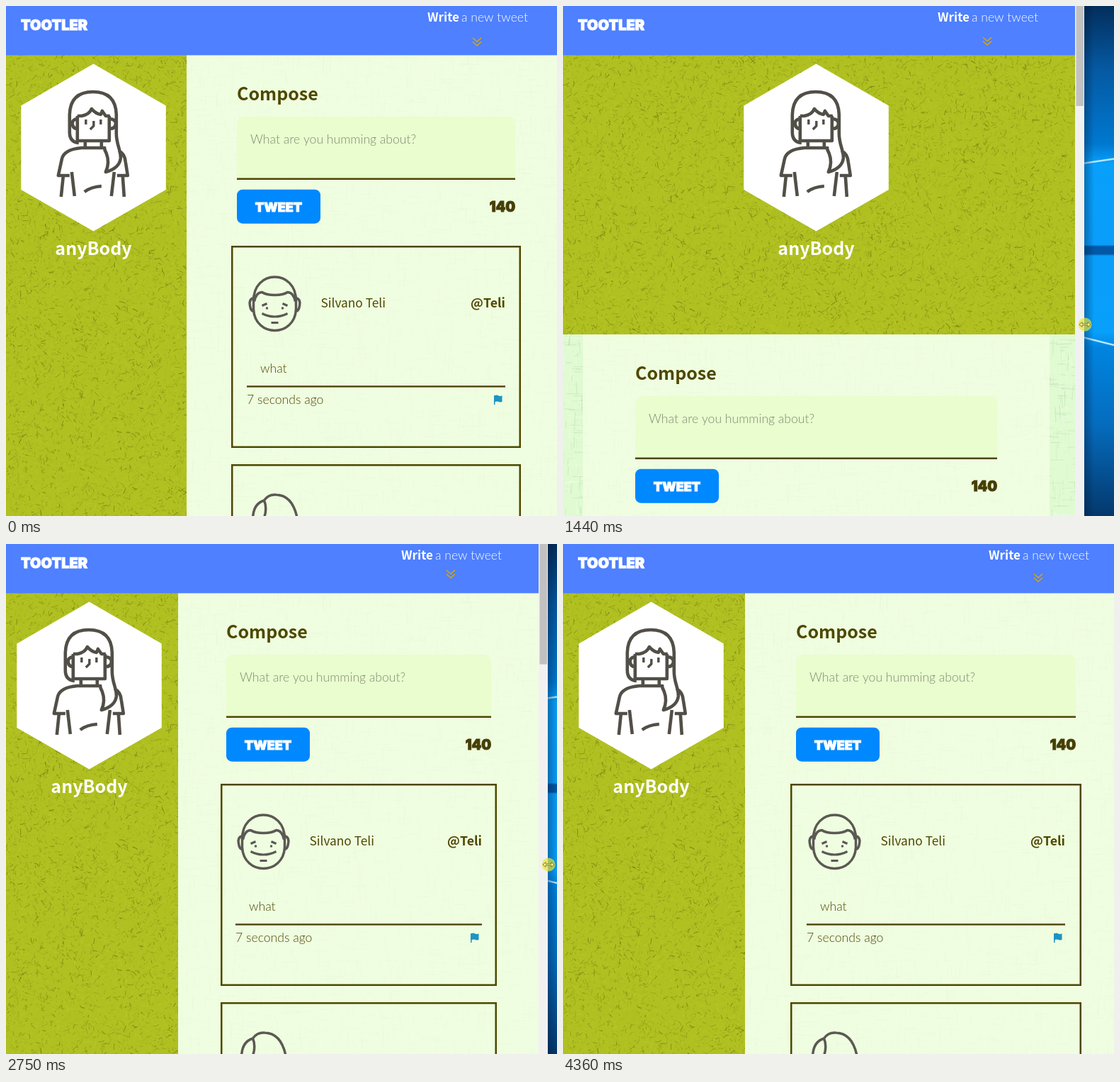
An HTML page with a canvas for the animation above (4.44 s loop, 778 px wide and 719 px high).

```html
<!DOCTYPE html>
<html lang="en">
<head>
<meta charset="utf-8">
<title>Responsive page</title>
<style>
html, body { margin: 0; width: 100%; height: 100%; overflow: hidden; }
canvas { display: block; }
</style>
</head>
<body>
<canvas id="stage" width="778" height="719"></canvas>
<script>
const LOOP = 4440, STEP = 76.55, BREAKPOINT = 734;
const OLIVE = '#4d4800', INK = '#514f47', GREY = '#5b5953';
const SANS = '"Noto Sans CJK JP", "Noto Sans CJK SC", sans-serif';
const BOLD = '700 17.8px ' + SANS, TITLE = '700 25px ' + SANS, NAME = '400 17.3px ' + SANS;
const LIGHT = '300 17.6px Lato, sans-serif';

// time, page width, cursor x, cursor y
const keys = [
  [0, 789, 802, 442], [70, 788, 800, 442], [530, 760, 772, 444], [690, 760, 771, 444],
  [1060, 733, 749, 447], [1440, 723, 737, 449], [2210, 723, 737, 449], [2450, 734, 748, 451],
  [2670, 747, 761, 452], [3060, 768, 782, 453], [3210, 769, 783, 453], [3600, 782, 796, 453],
  [3750, 787, 800, 453], [4290, 795, 808, 453], [4440, 795, 808, 453]
];

const ctx = document.getElementById('stage').getContext('2d');

let seed = 7;
const rnd = () => (seed = seed * 16807 % 2147483647) / 2147483647;

function texture(base, paint) {
  const c = document.createElement('canvas');
  c.width = 800;
  c.height = 720;
  const g = c.getContext('2d');
  g.fillStyle = base;
  g.fillRect(0, 0, 800, 720);
  paint(g);
  return c;
}

const fibres = texture('#b0c021', g => {
  for (let i = 0; i < 36000; i++) {
    const x = rnd() * 800, y = rnd() * 720, a = rnd() * 6.28, b = a + rnd() * 2 - 1;
    const r = 0.8 + 4 * rnd() ** 2;
    g.strokeStyle = i % 3 ? `rgba(75,85,0,${0.05 + 0.42 * rnd() ** 2})` : 'rgba(192,208,45,.35)';
    g.lineWidth = 0.6 + rnd() * 0.6;
    g.beginPath();
    g.moveTo(x, y);
    g.quadraticCurveTo(x + r * Math.cos(a), y + r * Math.sin(a),
      x + r * (Math.cos(a) + Math.cos(b)), y + r * (Math.sin(a) + Math.sin(b)));
    g.stroke();
  }
});

const linen = texture('#e0fad2', g => {
  for (let i = 0; i < 9000; i++) {
    const x = rnd() * 800, y = rnd() * 720, r = 4 + rnd() * 20, d = rnd() * 3 - 1.5;
    g.strokeStyle = i % 3 ? `rgba(110,175,115,${rnd() * 0.3})` : 'rgba(248,255,240,.5)';
    g.lineWidth = 0.8;
    g.beginPath();
    g.moveTo(x, y);
    if (i % 2) g.lineTo(x + r, y + d);
    else g.lineTo(x + d, y + r);
    g.stroke();
  }
});

const woman = new Path2D(
  'M103 193 Q90 192 90 178 V153 Q91 121 123 121 Q155 121 156 153 V180' +
  'C156 196 163 204 162 215 Q160 229 141 234 Q147 221 142 208 Q139 203 139 198' +
  'M101 155 V190 H146 V155 M101 155 H107 Q118 153 121 145 Q127 152 134 153 L136 148 L141 155 H147' +
  'M101 159 Q93 160 94 167 Q95 173 101 173 M147 159 Q156 160 155 167 Q154 173 147 173' +
  'M112 191 V200 M135 191 V200 M139 200 H107 Q82 202 79 216 L74 239 H90' +
  'M93 234 L97 268 M81 240 L78 269 M159 204 Q168 208 169 220 L172 239 H157' +
  'M153 234 L149 268 M165 240 L167 269 M111 262 Q120 255 135 254');
const womanFace = new Path2D('M113 160 V167 M134 160 V167 M124 162 V169 L119 174');

const man = new Path2D(
  'M-30 -3 C-31 -49 31 -49 30 -3 V8 C28 48 -28 48 -30 8 Z' +
  'M-30 -8 Q-37 -6 -35 3 Q-34 11 -29 11 M30 -8 Q37 -6 35 3 Q34 11 29 11' +
  'M-29 -3 C-27 -12 -23 -16 -18 -16 Q-12 -12 0 -12 Q12 -12 18 -16 C23 -16 27 -12 29 -3');
const manFace = new Path2D(
  'M-18 3 L-11 0 M18 3 L11 0 M-18 14 Q0 23 18 14 M-5 27 H5 M-11 5 V8 M11 5 V8');
const hair = new Path2D(
  'M-31 36 Q-31 14 -15 9 Q-9 0 2 1 Q26 2 32 36 M-15 9 Q-10 21 -16 36');

function text(str, x, y, font, color, align = 'left') {
  ctx.font = font;
  ctx.fillStyle = color;
  ctx.textAlign = align;
  ctx.fillText(str, x, y);
}

// extra heavy lettering: filled and outlined
function chunky(str, x, y, size, color, align) {
  text(str, x, y, `900 ${size}px Inter, sans-serif`, color, align);
  ctx.lineWidth = 1;
  ctx.strokeStyle = color;
  ctx.strokeText(str, x, y);
}

function rect(x, y, w, h, color) {
  ctx.fillStyle = color;
  ctx.fillRect(x, y, w, h);
}

function rounded(x, y, w, h, r, color) {
  ctx.fillStyle = color;
  ctx.beginPath();
  ctx.roundRect(x, y, w, h, r);
  ctx.fill();
}

function line(path, width, color) {
  ctx.lineWidth = width;
  ctx.strokeStyle = color;
  ctx.stroke(path);
}

function at(x, y, draw) {
  ctx.save();
  ctx.translate(x, y);
  draw();
  ctx.restore();
}

function pose(t) {
  const i = Math.max(1, keys.findIndex(k => k[0] > t));
  const a = keys[i - 1], b = keys[i], f = (t - a[0]) / (b[0] - a[0]);
  return a.slice(1).map((v, j) => Math.round(v + (b[j + 1] - v) * f));
}

function desktop(edge) {
  const g = ctx.createLinearGradient(0, 0, 0, 719);
  [[0, '#032e5c'], [0.12, '#0558a0'], [0.27, '#0078d0'], [0.31, '#08a0fb'], [0.468, '#0a9dfa'],
   [0.472, '#0058a6'], [0.486, '#0058a6'], [0.49, '#0a9dfa'], [0.64, '#08a0fb'],
   [0.67, '#0084e0'], [0.82, '#056cbe'], [1, '#04386c']].forEach(s => g.addColorStop(...s));
  rect(edge, 0, 778 - edge, 719, g);
  line(new Path2D('M730 222.5 L778 215.5 M730 466 L778 478'), 2.5, '#b4e6ff');
  const shade = ctx.createLinearGradient(edge, 0, edge + 14, 0);
  shade.addColorStop(0, 'rgba(0,20,50,.35)');
  shade.addColorStop(1, 'rgba(0,20,50,0)');
  rect(edge, 0, 14, 719, shade);
}

function header(w, t) {
  rect(0, 0, w, 69.4, '#4e80ff');
  chunky('TOOTLER', 21, 34, 20, '#fff');
  const right = w - 52;
  text('Write', right - 142, 22, '700 17px ' + SANS, '#fff');
  text('a new tweet', right, 22, LIGHT, '#fff', 'right');
  const y = 45 + 9.7 * Math.sin((t - 1340) / 1480 * 2 * Math.PI);
  at(w - 124, y, () =>
    line(new Path2D('M-6 -5.5 L0 0 L6 -5.5 M-6 0 L0 5.5 L6 0'), 1.7, '#cba02a'));
}

function profile(cx) {
  at(cx - 123.7, 0, () => {
    ctx.fillStyle = '#fff';
    ctx.fill(new Path2D('M123.7 81.5 L226 140.5 V259 L123.7 317.5 L21.5 259 V140.5 Z'));
    ctx.lineJoin = 'round';
    line(woman, 4.6, INK);
    line(womanFace, 3.4, INK);
  });
  text('anyBody', cx, 351, TITLE, '#fff', 'center');
}

function card(x, y, w, h) {
  ctx.lineWidth = 2.5;
  ctx.strokeStyle = OLIVE;
  ctx.strokeRect(x + 1.25, y + 1.25, w - 2.5, h - 2.5);
}

function feed(left, right) {
  text('Compose', left, 133, TITLE, OLIVE);
  rounded(left, 156, right - left, 88, [10, 10, 0, 0], '#e9fdcf');
  rect(left, 242.5, right - left, 2.5, OLIVE);
  text('What are you humming about?', left + 19, 194, LIGHT, '#7f8a70');
  rounded(left, 258.7, 118, 48, 8, '#0088ff');
  chunky('TWEET', left + 59, 289.5, 18, '#fff', 'center');
  chunky('140', right, 289.5, 19.5, '#453f00', 'right');

  const x = left - 8, w = right - left + 16, pad = Math.round(w * 0.055);
  const l = x + pad, r = x + w - pad;
  card(x, 338, w, 285);
  at(l + 39.5, 419.5, () => {
    line(man, 3.5, GREY);
    line(manFace, 3.1, GREY);
  });
  text('Silvano Teli', l + 104.5, 425, NAME, OLIVE);
  text('@Teli', r, 425, BOLD, OLIVE, 'right');
  text('what', l + 19, 517, LIGHT, OLIVE);
  rect(l, 535.2, r - l, 2.4, OLIVE);
  text('7 seconds ago', l, 561, LIGHT, OLIVE);
  at(r - 16, 549, () => {
    ctx.fillStyle = '#1c94c4';
    ctx.fill(new Path2D('M0 0 H1.5 Q4 -1 6.5 .5 Q9 1.5 11.5 .3 V9 Q8.5 10 6 8.8 Q4 8 1.5 9 V13 H0 Z'));
  });

  card(x, 646, w, 285);
  at(l + 39.5, 688, () => line(hair, 3.5, GREY));
}

function cursor(x, y) {
  at(x, y, () => {
    ctx.fillStyle = 'rgba(232,228,60,.7)';
    ctx.beginPath();
    ctx.arc(0, 0, 9.5, 0, 7);
    ctx.fill();
    const arrows = new Path2D('M-8 0 L-4 -3.5 V-1 H4 V-3.5 L8 0 L4 3.5 V1 H-4 V3.5 Z');
    ctx.fillStyle = '#f4f08a';
    ctx.fill(arrows);
    line(arrows, 0.9, '#77751c');
  });
}

function draw(now) {
  const t = Math.floor((now % LOOP + 15) / STEP) * STEP % LOOP;
  const [w, mx, my] = pose(t);
  const narrow = w < BREAKPOINT;
  const side = narrow ? w : Math.round(w / 3 - 8);

  desktop(w + 13);
  rect(w, 0, 13, 719, '#f1f1f1');
  rect(w + 1.5, 0, 10.5, narrow ? 141 : Math.min(171, 166 + (w - 734) / 5), '#c1c1c1');

  ctx.save();
  ctx.beginPath();
  ctx.rect(0, 0, w, 719);
  ctx.clip();
  ctx.drawImage(linen, 0, 0);
  const mainLeft = narrow ? Math.round(w * 0.05 - 8) : side;
  const mainRight = narrow ? Math.round(w * 0.95) : w;
  rect(mainLeft, 69, mainRight - mainLeft, 650, 'rgba(243,254,227,.82)');

  const sideHeight = narrow ? 394 : 650;
  ctx.drawImage(fibres, 0, 0, side, sideHeight, 0, 69, side, sideHeight);
  header(w, t);
  profile(side / 2 - 4);

  const left = narrow ? mainLeft + w * 0.1 + 2 : w * 0.41333;
  const right = narrow ? mainRight - w * 0.1 - 2 : w * 0.92 - 7;
  at(0, narrow ? 394 : 0, () => feed(Math.round(left), Math.round(right)));
  ctx.restore();

  cursor(mx, my);
}

const start = performance.now();
function tick() {
  draw(performance.now() - start);
  requestAnimationFrame(tick);
}
tick();
</script>
</body>
</html>
```
